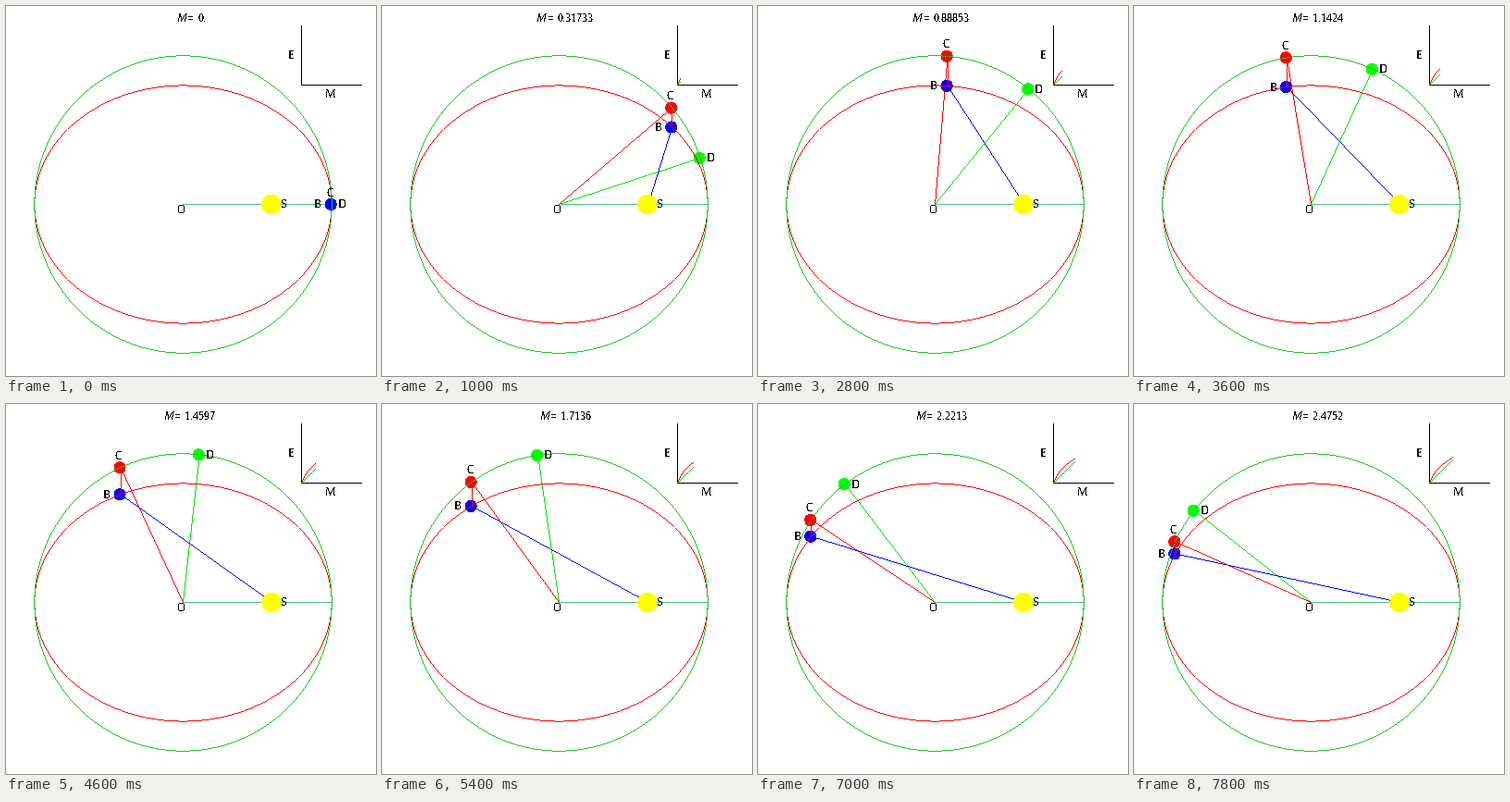
Animation of 400x400 px, one loop 8 s. Source, as a matplotlib script:

```python
import numpy as np
import matplotlib.pyplot as plt
from matplotlib.animation import FuncAnimation
from matplotlib.patches import Circle

PX = 0.72                      # one pixel in points at 100 dpi
OX, OY, A, ECC = 190.5, 214.5, 160.7, 0.6
B_AXIS = A * np.sqrt(1 - ECC ** 2)
SX = OX + A * ECC
GX, GY, UNIT = 318.5, 85.5, 10.4
FRAMES, STEP = 40, 2 * np.pi / 99
RED, GREEN, LIME, BLUE = "#ff0000", "#1ec81e", "#00e600", "#0000ff"

plt.rcParams["font.family"] = "Liberation Serif"
plt.rcParams["text.hinting"] = "native"
plt.rcParams["text.hinting_factor"] = 1
fig = plt.figure(figsize=(4, 4), dpi=100, facecolor="white")
ax = fig.add_axes([0, 0, 1, 1])
ax.set_xlim(0, 400)
ax.set_ylim(400, 0)
ax.axis("off")


def centres(a, b):
    """Pixel centres lying between a and b."""
    lo, hi = min(a, b), max(a, b)
    return np.arange(np.ceil(lo - 0.5), np.floor(hi - 0.5) + 1) + 0.5


def slope_at(t, a0, b0, a1, b1):
    return np.floor(b0 + (t - a0) * (b1 - b0) / (a1 - a0 or 1)) + 0.5


def pixels(x, y):
    """One pixel per step along the longer axis of each segment."""
    px, py = [], []
    for x0, y0, x1, y1 in zip(x[:-1], y[:-1], x[1:], y[1:]):
        if abs(x1 - x0) >= abs(y1 - y0):
            u = centres(x0, x1)
            v = slope_at(u, x0, y0, x1, y1)
        else:
            v = centres(y0, y1)
            u = slope_at(v, y0, x0, y1, x1)
        px.extend(u)
        py.extend(v)
    return px, py


def line(color, z=2, x=(), y=()):
    return ax.plot(*pixels(x, y), ",", color=color, zorder=z)[0]


def dot(x, y, r, color, z):
    return ax.add_patch(Circle((x, y), r, fc=color, ec="none",
                               antialiased=False, zorder=z))


def label(s, x, y, **kw):
    kw = {"ha": "center", **kw}
    return ax.text(x, y + 4, s, size=13 * PX, va="baseline", color="black",
                   antialiased=False, zorder=9, **kw)


def solve(m):
    e = m + ECC * np.sin(m)
    for _ in range(12):
        e = e - (e - ECC * np.sin(e) - m) / (1 - ECC * np.cos(e))
    return e


def point(angle, ry=A):
    return OX + A * np.cos(angle), OY - ry * np.sin(angle)


turn = np.linspace(0, 2 * np.pi, 361)
line(RED, 5, *point(turn, B_AXIS))
line(GREEN, 5, *point(turn))
line("#50be82", 2.5, [OX, OX + A], [OY, OY])
line("black", 2, [GX, GX, GX + 65], [GY - 64, GY, GY])
dot(SX, OY, 10, "#ffff00", 6)
label("S", SX + 14, OY)
label("O", OX - 1, OY + 5.5)
label("E", GX - 10.5, 53)
label("M", GX + 32.5, 95)

ray_d, ray_c, ray_s = line(LIME), line(RED), line(BLUE)
drop = line(RED, 5)
graph_m, graph_e = line(GREEN), line(RED)
dots = {"D": dot(0, 0, 6, "#00ff00", 3),
        "C": dot(0, 0, 6, RED, 3),
        "B": dot(0, 0, 6, BLUE, 4)}
offsets = {"B": (-14, 0), "C": (-1, -13), "D": (11.7, 0)}
names = {k: label(k, 0, 0) for k in dots}
title = [label("M", 0, 13, ha="left", style="italic"),
         label("=", 0, 13, ha="left"),
         label("", 0, 13, ha="left")]


def update(i):
    m = i * STEP
    e = solve(m)
    spots = {"B": point(e, B_AXIS), "C": point(e), "D": point(m)}
    for k, (x, y) in spots.items():
        dots[k].center = (x, y)
        dx, dy = offsets[k]
        names[k].set_position((x + dx, y + dy + 4))
    (bx, by), (cx, cy), (dx, dy) = (spots[k] for k in "BCD")
    ray_d.set_data(*pixels([OX, dx], [OY, dy]))
    ray_c.set_data(*pixels([OX, cx], [OY, cy]))
    ray_s.set_data(*pixels([SX, bx], [OY, by]))
    drop.set_data(*pixels([cx, bx], [cy, by]))

    ms = np.arange(i + 1) * STEP
    graph_m.set_data(*pixels(GX + UNIT * ms, GY - UNIT * ms))
    graph_e.set_data(*pixels(GX + UNIT * ms, GY - UNIT * solve(ms)))

    number = f"{m:#.5g}" if i else "0."
    width = 22.5 + 7 * (len(number) - 1) + 3
    left = 201 - width / 2
    for part, shift in zip(title, (0, 12, 22.5)):
        part.set_x(left + shift)
    title[2].set_text(number)
    return []


anim = FuncAnimation(fig, update, frames=FRAMES, interval=200,
                     init_func=lambda: update(0), repeat=True,
                     repeat_delay=0, blit=False)
plt.show()
```
